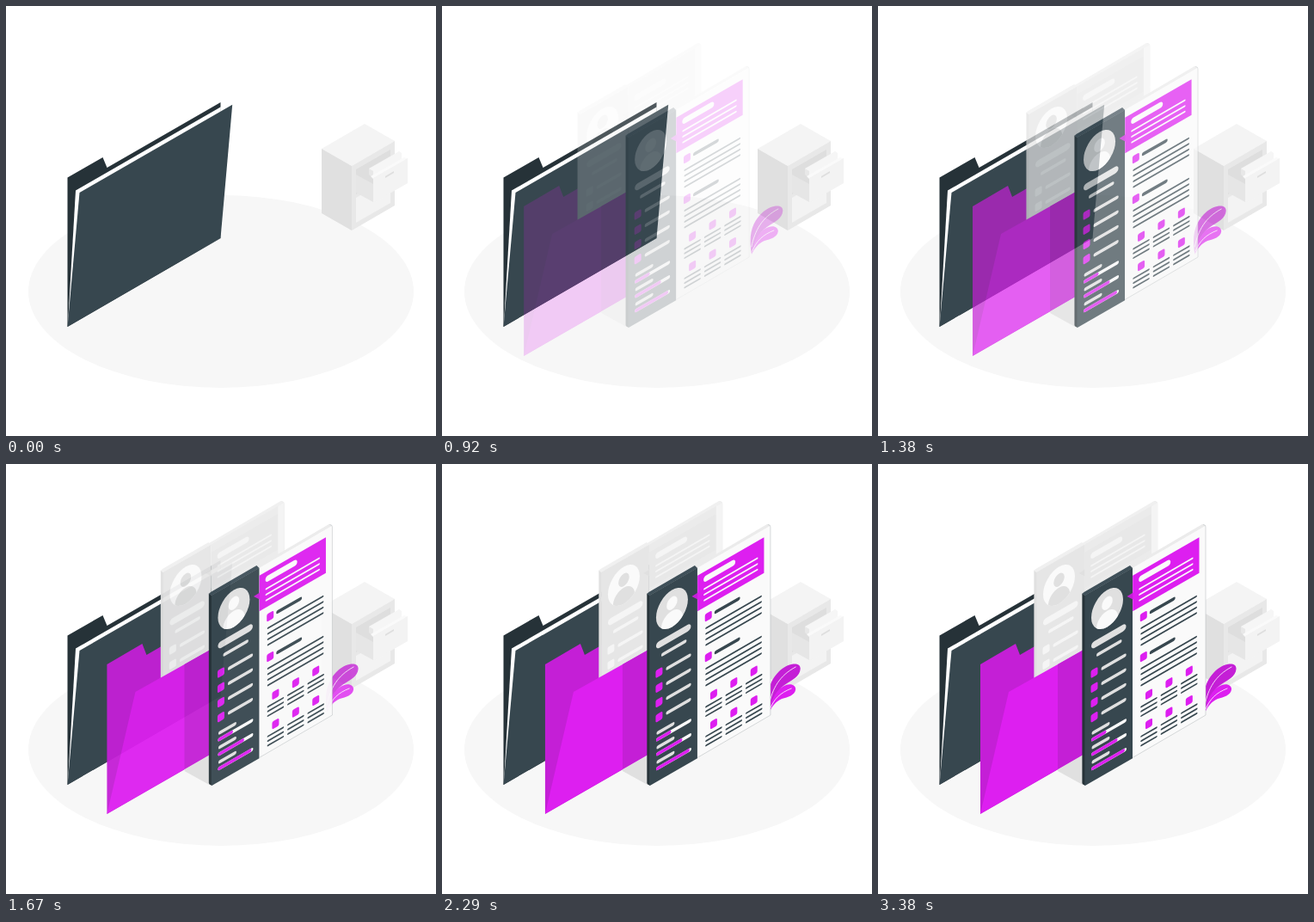
Animation of 500 by 500 pixels, one loop 3430 ms. Source, as an HTML page:

```html
<!DOCTYPE html>
<html lang="en">
<head>
<meta charset="utf-8">
<title>Folder and résumé</title>
<style>
  html, body { margin: 0; width: 100%; height: 100%; overflow: hidden; background: #fff; }
  svg { display: block; width: 100vw; height: 100vh; }
</style>
</head>
<body>
<svg viewBox="0 0 500 500" xmlns="http://www.w3.org/2000/svg">
  <ellipse cx="250" cy="332" rx="224" ry="112" fill="#f7f7f7"/>

  <g id="cabinet">
    <path d="M367 166 417 137 452 157 402 186Z" fill="#f4f4f4"/>
    <path d="M367 166 402 186V261L367 241Z" fill="#e0e0e0"/>
    <path d="M402 186 452 157V232L402 261Z" fill="#e8e8e8"/>
    <path d="M407 190 447 167V196L407 219Z" fill="#dedede"/>
    <path d="M407 223 447 200V229L407 252Z" fill="#f3f3f3"/>
    <path d="M407 196 427 207V228L407 217Z" fill="#e6e6e6"/>
    <path d="M422 189 457 169 460 171V178L428 197 422 194Z" fill="#f6f6f6"/>
    <path d="M422 189 427 192V200L422 196Z" fill="#e8e8e8"/>
    <path d="M424 198 463 176 467 178 427 201Z" fill="#fafafa"/>
    <path d="M427 200 467 177V206L427 229Z" fill="#f3f3f3"/>
    <path d="M441 198 451 192V194L441 200Z" fill="#dedede"/>
  </g>

  <g id="darkFolder">
    <path d="M71.500 199.500 112.500 176 117.500 188 249.500 112V270L71.500 373Z" fill="#263238"/>
    <path d="M81 214.500 249.500 117.500V270L72 369Z" fill="#fff"/>
    <path d="M249.500 117.500 263 115 249.500 270Z" fill="#fff"/>
    <path d="M85.500 217 263.200 114.800 249.500 270 71.500 373Z" fill="#37474f"/>
  </g>

  <g id="leaf" opacity="0">
    <path d="M380 288C376 263 382 250 394 239C402 232 416.500 229 416.500 238C416 247 407 251 398 257C388 264 384 275 380 288Z" fill="#c41fd6"/>
    <path d="M380 289C383 272 389 261 400 257C407 255 411 258 411 262C410 269 402 271 395 273C388 276 384 281 380 289Z" fill="#dd1ff0"/>
    <path d="M380 280C384 261 392 246 411 236M381 285C386 273 393 266 406 261" fill="none" stroke="#fff" stroke-width=".8" stroke-linecap="round"/>
  </g>

  <g id="stack" opacity="0">
    <path d="M119 233 160 209 165 222 260 167V326L119 407Z" fill="#c41fd6"/>
    <g id="backDoc" transform="translate(-56 -27)"></g>
    <path d="M209 236 250 212V366L238 373 209 357Z" fill="#e0e0e0"/>
    <path d="M152 265 260 204.500V325.500L119 406.800Z" fill="#dd1ff0"/>
    <path d="M209 233 260 204V325.500L209 355Z" fill="#c41fd6"/>
    <g id="frontDoc"></g>
  </g>
</svg>

<script>
const LOOP = 3430;
const $ = id => document.getElementById(id);

const line = (u1, u2, v, w, color) =>
  `<path d="M${u1} ${v}H${u2}" stroke="${color}" stroke-width="${w}" stroke-linecap="round"/>`;
const box = (u, v, w, h, color, r = 0) =>
  `<rect x="${u}" y="${v}" width="${w}" height="${h}" rx="${r}" fill="${color}"/>`;
const chip = (u, v, color) => box(u - 4, v - 4.5, 8, 9, color, 1.8);

// Page drawn flat, then sheared onto the isometric plane.
function drawDoc(id, c) {
  let s = box(55, 152.5, 85, 220.3, c.page, 1) + box(-.6, 152.5, 55.6, 221.5, c.side);

  s += `<clipPath id="${id}Clip"><ellipse cx="25.500" cy="182.700" rx="18.500" ry="21.400"/></clipPath>
    <g clip-path="url(#${id}Clip)">${box(5, 160, 42, 46, c.disc)}
    <ellipse cx="25.500" cy="176.500" rx="6.300" ry="7.300" fill="${c.person}"/>
    <ellipse cx="25.500" cy="199" rx="12.500" ry="13.500" fill="${c.person}"/></g>`;
  s += line(11, 43.5, 216, 8, c.bar) + line(15, 40.5, 230, 4, c.bar);
  for (let i = 0; i < 4; i++) {
    const v = 248.6 + i * 17.2;
    s += chip(10.5, v, c.chip) + line(20.5, 45.7, v + .6, 4, c.bar);
  }
  [22.5, 35.5, 44].forEach((end, i) => {
    const v = 317.7 + i * 16.9;
    s += line(9.5, 26.5, v, 4, c.bar) + line(9, 46, v + 7.5, 4, c.track) +
         line(9, end, v + 7.5, 4, c.chip);
  });

  s += `<path d="M48.500 182 56 181.500V190Z" fill="${c.notch}"/>` + box(55.2, 161.7, 77.3, 41.5, c.band);
  s += line(65.7, 95.7, 170.8, 7, c.track);
  for (let i = 0; i < 3; i++) s += line(63.2, 124.5, 181.7 + i * 6.6, 2, c.track);

  for (const top of [216.2, 263.2]) {
    s += chip(67.8, top, c.chip) + line(76.8, 102.7, top, 4, c.text);
    for (let i = 0; i < 4; i++) s += line(65.3, 129, top + 12.3 + i * 6.5, 1.9, c.text);
  }
  for (let row = 0; row < 2; row++) for (let col = 0; col < 3; col++) {
    const u = 74 + col * 23.4, v = 310.4 + row * 34.4;
    s += chip(u, v, c.chip);
    for (let i = 0; i < 3; i++) s += line(u - 8.8, u + 8.8, v + 9.5 + i * 5.3, 1.9, c.text);
  }

  $(id).innerHTML = `
    <path d="M292 120 377 70Q379 69.500 381 72L296 122Z" fill="${c.rim}"/>
    <path d="M241 153 237.400 150.500V370.500Q237.400 373 241 373.500Z" fill="${c.edge}"/>
    <path d="M237.400 151 239.500 149 293 118 296 121 240.400 153Z" fill="${c.ridge}"/>
    <g fill="none" transform="matrix(1 -.5774 0 1 241 0)">${s}</g>
    <path d="M378 70.500Q381 70.500 381 73V292L296 341.500" fill="none" stroke="${c.outline}" stroke-width=".5"/>`;
}

drawDoc('backDoc', {
  page: '#ebebeb', side: '#e6e6e6', edge: '#e0e0e0', ridge: '#f0f0f0', rim: '#f0f0f0', outline: '#e6e6e6',
  disc: '#fafafa', bar: '#f5f5f5', track: '#f5f5f5', person: '#e0e0e0', chip: '#f5f5f5',
  band: '#e8e8e8', notch: '#e0e0e0', text: '#f5f5f5'
});
// Wide light margin of the rear page
$('backDoc').insertAdjacentHTML('beforeend', '<path d="M374 76 381 72V292L374 296Z" fill="#f4f4f4"/>');

drawDoc('frontDoc', {
  page: '#fafafa', side: '#37474f', edge: '#263238', ridge: '#3f5059', rim: '#ebebeb', outline: '#b0b6b9',
  disc: '#e0e0e0', bar: '#e0e0e0', track: '#fafafa', person: '#fafafa', chip: '#dd1ff0',
  band: '#dd1ff0', notch: '#c41fd6', text: '#37474f'
});

// cubic-bezier(.36, -.01, .5, 1.38)
function ease(x) {
  if (x <= 0) return 0;
  if (x >= 1) return 1;
  const curve = (a, b, s) => 3 * a * s * (1 - s) ** 2 + 3 * b * s * s * (1 - s) + s ** 3;
  let lo = 0, hi = 1;
  for (let i = 0; i < 24; i++) {
    const mid = (lo + hi) / 2;
    if (curve(.36, .5, mid) < x) lo = mid; else hi = mid;
  }
  return curve(-.01, 1.38, lo);
}

function slide(el, p) {
  el.setAttribute('transform', `translate(${(30 * (p - 1)).toFixed(3)} 0)`);
  el.setAttribute('opacity', Math.max(0, Math.min(1, p)).toFixed(4));
}

function render(now) {
  const t = now % LOOP;
  slide($('stack'), ease((t - 466) / 1914));
  slide($('leaf'), t < 250 ? 0 : ease((t + 150) / 3540));
}

const start = performance.now();
function tick() {
  render(performance.now() - start);
  requestAnimationFrame(tick);
}
tick();
</script>
</body>
</html>
```
